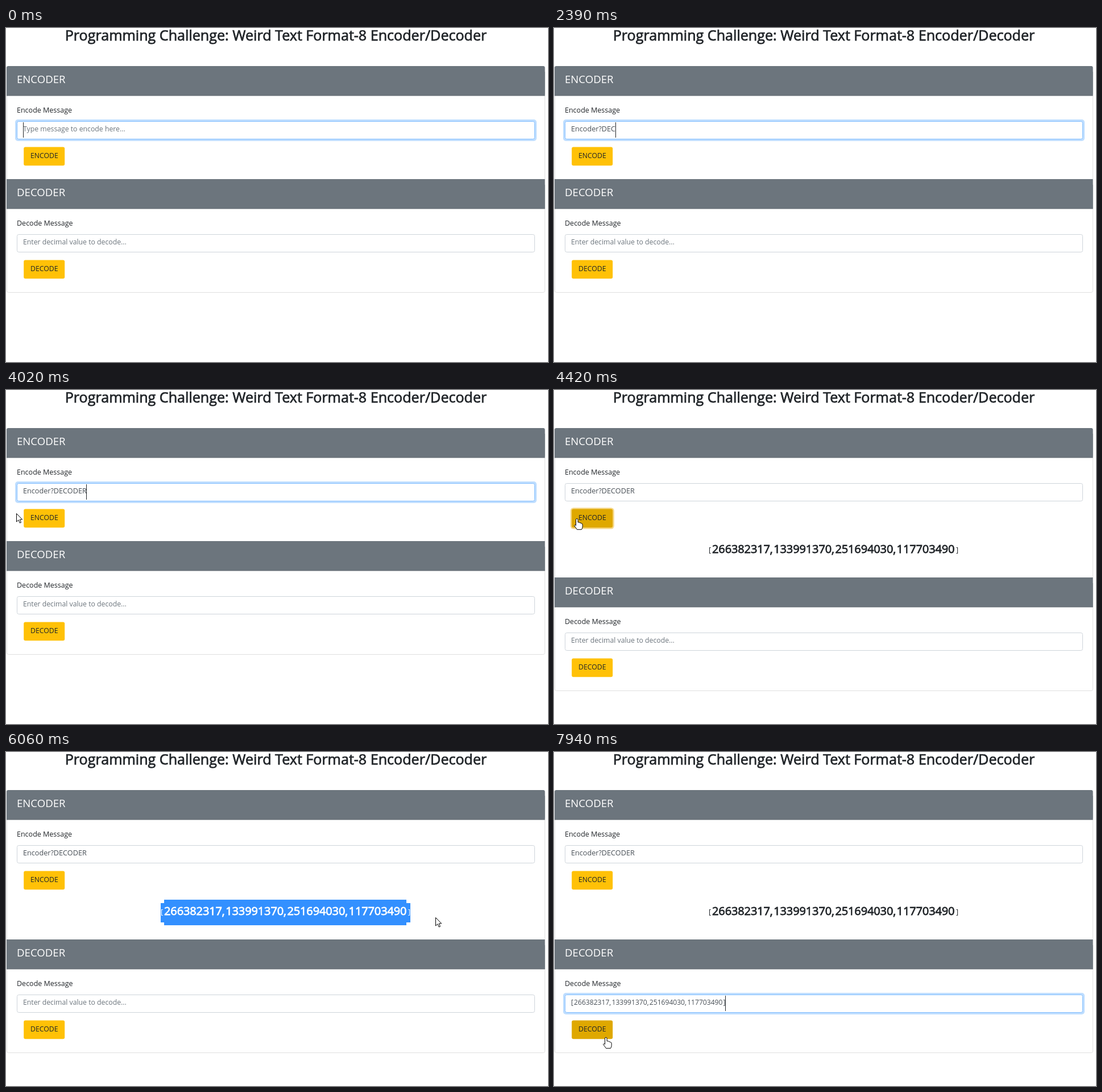
Write an HTML page that moves like this. It is 953 px wide and 588 px high and loops after 8 s.

```html
<!DOCTYPE html>
<html lang="en">
<head>
<meta charset="utf-8">
<title>Encoder/Decoder</title>
<style>
  html, body { margin: 0; width: 100%; height: 100%; overflow: hidden; background: #fff; }
  svg { display: block; width: 953px; height: 588px; font: 12.5px "Open Sans", "Noto Sans", sans-serif; fill: #212529; }
  text { white-space: pre; }
  .title { font-size: 25.1px; text-anchor: middle; stroke: #212529; stroke-width: .75px; }
  .bar { fill: #6c757d; }
  .edge { fill: #5f676e; }
  .head { font-size: 18.6px; fill: #fff; }
  .frame { fill: none; stroke: #dfdfdf; }
  .field { fill: #fff; stroke: #ced4da; }
  .focus .field { stroke: #80bdff; }
  .ring { fill: #bfdeff; visibility: hidden; }
  .focus .ring { visibility: visible; }
  .btn { fill: #ffc107; }
  .hover .btn { fill: #dfa800; }
  .btn-ring { fill: #f6d88a; }
  .btn-label { font-size: 12.25px; text-anchor: middle; }
  .hint { font-size: 12.25px; fill: #6c757d; }
  .value { font-size: 12.65px; fill: #495057; }
  #decoder .value { font-size: 12.1px; word-spacing: -2px; }
  .caret { fill: #212529; }
  .nums { font-size: 20px; letter-spacing: -.12px; word-spacing: -3.5px; stroke: #212529; stroke-width: .8px; }
  #picked { fill: #fff; }
  #picked rect { fill: #3390ff; }
  #picked .nums { stroke: #fff; }
  #spot { fill: #ff0; opacity: .5; }
  #mouse path { stroke: #000; stroke-width: 1; stroke-linejoin: round; fill: #fff; }
  #mouse #beam { stroke: #333; stroke-width: .9; fill: none; }
</style>
</head>
<body>
<svg viewBox="0 0 953 588">
  <defs><clipPath id="range"><rect id="rangeBox" x="272" y="255" width="0" height="55"/></clipPath></defs>
  <text class="title" x="474.5" y="22">Programming Challenge: Weird Text Format-8 Encoder/Decoder</text>
  <rect id="frame" class="frame" x="1.5" y="67.5" width="946" height="398" rx="3"/>
  <g id="encoder"></g>
  <g id="decoder"></g>
  <g id="result"></g>
  <g id="picked" clip-path="url(#range)">
    <rect x="272" y="266" width="439" height="34"/>
    <rect x="278" y="260" width="426" height="45"/>
  </g>
  <circle id="spot" cx="-1.5" cy="-1" r="10.2"/>
  <g id="mouse">
    <path id="arrow" d="M0 0V14.5L3.4 11.3 5.8 16.6 8 15.6 5.7 10.5H10.2Z"/>
    <path id="hand" d="M-2 1Q-2-1-.2-1Q1.6-1 1.6 1V5.5q3-.8 3.3 1q2.6-.6 3 1.2q1.8 0 1.8 2v3.5q0 2.3-1.7 5h-8q-2.2-3.6-5-7q1-2.2 3-.2z"/>
    <path id="beam" d="M-3-6.5H3M0-6.5V6.5M-3 6.5H3"/>
  </g>
</svg>
<script>
const LOOP = 8000;
const MESSAGE = "Encoder?DECODER";
const NUMBERS = "266382317, 133991370, 251694030, 117703490";
const KEY_TIMES = [340, 660, 810, 980, 1040, 1210, 1370, 1610, 1830, 2060, 2390, 2530, 2620, 2790, 2940];
const SHIFT = 64;

// Moments of the demo
const PRESS = 4110, BTN_FOCUS = 4185, ENCODED = 4260;
const DRAG = 5050, DROP = 6060, CLICK = 6990, FOCUSED = 7070, RELEASED = 7150, PASTE = 7540;

// Screen refreshes while the mouse moves: first, last, count
const REFRESH = [
  [3320, 4110, 11], [4190, 4490, 5], [4670, 5440, 11], [5520, 5910, 6],
  [6060, 6060, 1], [6230, 7000, 11], [7070, 7160, 2], [7540, 7940, 6]
];

// Mouse path: time, x, y
const PATH = [
  [3320, 109, 158], [3640, 60, 190], [3880, 8, 212], [4110, 40, 227], [4590, 40, 227],
  [5050, 271, 284], [5440, 468, 286], [5910, 755, 291], [6150, 755, 291],
  [7000, 255, 443], [7460, 255, 443], [7940, 91, 503]
];

const $ = id => document.getElementById(id);
const show = (el, on) => { el.style.visibility = on ? "visible" : "hidden"; };

function panel(id, top, name, verb, hint) {
  const g = $(id);
  const round = id === "encoder" ? 3 : 0;
  g.innerHTML = `
    <rect class="bar" x="1" y="${top}" width="946.5" height="52" rx="${round}"/>
    <rect class="bar" x="1" y="${top + 10}" width="946.5" height="42"/>
    <rect class="edge" x="1" y="${top + 51.5}" width="946.5" height="1"/>
    <text class="head" x="19" y="${top + 30}">${name}</text>
    <text x="19" y="${top + 82}">${verb} Message</text>
    <rect class="ring" x="16" y="${top + 94}" width="917" height="38" rx="5"/>
    <rect class="field" x="19.5" y="${top + 97.5}" width="910" height="31" rx="3"/>
    <text class="hint" x="30" y="${top + 115}">${hint}</text>
    <text class="value" x="30" y="${top + 115}"></text>
    <rect class="caret" y="${top + 99}" width="1" height="27"/>
    <rect class="btn-ring" x="28.8" y="${top + 140.2}" width="77" height="37.6" rx="5.5"/>
    <rect class="btn" x="31.2" y="${top + 142.6}" width="72" height="32.7" rx="3"/>
    <text class="btn-label" x="67.3" y="${top + 162}">${verb.toUpperCase()}</text>`;
  const part = name => g.querySelector("." + name);
  return { g, hint: part("hint"), value: part("value"), caret: part("caret"), btnRing: part("btn-ring") };
}

const enc = panel("encoder", 67, "ENCODER", "Encode", "Type message to encode here...");
const dec = panel("decoder", 266, "DECODER", "Decode", "Enter decimal value to decode...");
show(dec.btnRing, false);

const resultText = `<text x="272" y="286">[</text>
  <text class="nums" x="278" y="287">${NUMBERS}</text>
  <text x="707" y="286">]</text>`;
$("result").innerHTML = resultText;
$("picked").insertAdjacentHTML("beforeend", resultText);
const nums = $("result").querySelector(".nums");

function fill(p, text, focused, caretOn) {
  if (p.value.textContent !== text) p.value.textContent = text;
  show(p.hint, !text);
  p.g.classList.toggle("focus", focused);
  show(p.caret, caretOn);
  const width = text ? p.value.getComputedTextLength() : 0;
  p.caret.setAttribute("x", Math.round(29.6 + width));
}

// Latest refresh at or before t
function held(t) {
  let last = 0;
  for (const [from, to, n] of REFRESH) {
    if (t < from) break;
    const step = n > 1 ? (to - from) / (n - 1) : 1;
    last = from + step * Math.min(n - 1, Math.floor((t - from + 4) / step));
  }
  return last;
}

function mouseAt(t) {
  let i = 0;
  while (i < PATH.length - 2 && t >= PATH[i + 1][0]) i++;
  const [t0, x0, y0] = PATH[i], [t1, x1, y1] = PATH[i + 1];
  const k = Math.max(0, Math.min(1, (t - t0) / (t1 - t0)));
  return [x0 + (x1 - x0) * k, y0 + (y1 - y0) * k];
}

function selectionEnd(x) {
  if (x >= 704) return 711;
  const n = Math.floor((x - 278) / 426 * NUMBERS.length);
  return n > 0 ? 278 + nums.getSubStringLength(0, n) : 272;
}

function draw(now) {
  const t = now % LOOP;
  const m = held(t);
  const [x, y] = mouseAt(m);
  const within = (l, r, top, bottom) => x >= l && x <= r && y >= top && y <= bottom;
  const done = m >= ENCODED;
  const moving = m >= 3320;
  const dragging = m >= DRAG && m < DROP;
  const down = (m >= PRESS && m < ENCODED) || dragging || (m >= CLICK && m < RELEASED);

  const typed = MESSAGE.slice(0, KEY_TIMES.filter(k => t >= k).length);
  const typing = m < PRESS;
  fill(enc, typed, typing, typing && (t < 70 || typed !== ""));
  fill(dec, m >= PASTE ? `[ ${NUMBERS} ]` : "", m >= FOCUSED, m >= CLICK);

  dec.g.setAttribute("transform", `translate(0 ${done ? SHIFT : 0})`);
  $("frame").setAttribute("height", done ? 398 + SHIFT : 398);
  show($("result"), done);

  const onEnc = moving && within(31, 103, 210, 242);
  const onDec = moving && within(31, 103, 473, 506);
  enc.g.classList.toggle("hover", onEnc);
  dec.g.classList.toggle("hover", onDec);
  show(enc.btnRing, m >= BTN_FOCUS && m < DRAG);

  const end = m >= DROP ? 711 : selectionEnd(x);
  show($("picked"), m >= DRAG && m < CLICK);
  $("rangeBox").setAttribute("width", end - 272);

  const overText = dragging || within(19, 930, 164, 196) || within(19, 930, 427, 459) ||
    (done && within(272, 711, 266, 300));
  const shape = onEnc || onDec ? "hand" : overText ? "beam" : "arrow";
  for (const id of ["arrow", "hand", "beam"]) show($(id), moving && id === shape);
  const place = `translate(${Math.round(x) + .5} ${Math.round(y) + .5})`;
  $("mouse").setAttribute("transform", place);
  $("spot").setAttribute("transform", place);
  show($("spot"), down);
}

const start = performance.now();
function tick() {
  draw(performance.now() - start);
  requestAnimationFrame(tick);
}
tick();
</script>
</body>
</html>
```
